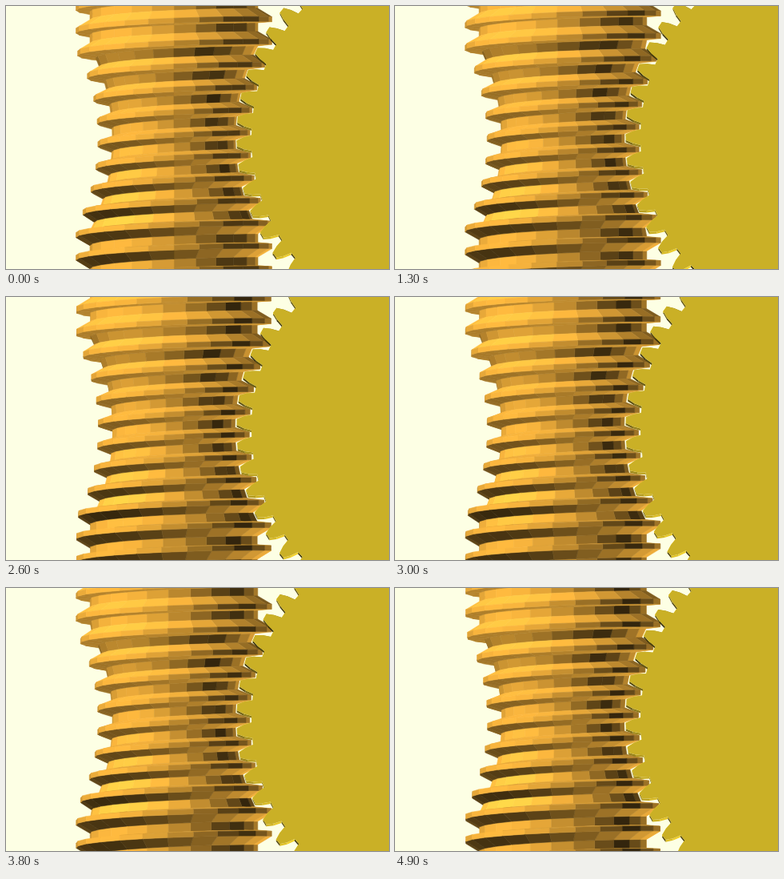
Animation of 479x329 px, one loop 5 s. Source, as an HTML page with a canvas:

```html
<!DOCTYPE html>
<html lang="en">
<head>
<meta charset="utf-8">
<title>Worm gear</title>
<style>
html, body { margin: 0; width: 479px; height: 329px; overflow: hidden; background: #fdffe4; }
canvas { display: block; }
</style>
</head>
<body>
<canvas id="stage" width="479" height="329"></canvas>
<script>
const ctx = document.getElementById('stage').getContext('2d');
const LOOP = 5000, STEP = 100, RAD = Math.PI / 180;
const AXIS = 210, MID = 165.7;            // worm axis x, throat y
const LEAD = 28.4, FACET = 15;            // thread pitch in px, facet in degrees
const GEAR_X = 541, TEETH = 53, REACH = GEAR_X - AXIS;
const TILT = 0.045;                       // the view comes slightly from below
const HALF = 28;                          // half the gear's thickness
const WORM = [252, 183, 62], GEAR = [249, 215, 44];

// Two opposite lights: top-left front and bottom-right back.
function shade(base, [x, y, z]) {
  const lit = 0.2 + Math.abs(z - x - y) / Math.sqrt(3) / Math.hypot(x, y, z);
  return `rgb(${base.map(c => Math.min(255, Math.round(c * lit)))})`;
}

function polygon(points, color, line) {
  ctx.beginPath();
  for (const [x, y, z] of points) ctx.lineTo(x, y - z * TILT);
  ctx.closePath();
  ctx.fillStyle = color;
  ctx.fill();
  if (line) {
    ctx.strokeStyle = color;
    ctx.lineWidth = line;
    ctx.stroke();
  }
}

// Hourglass radius at height y, limited by a cylinder.
const waist = (y, arc, limit) =>
  Math.min(limit, REACH - Math.sqrt(Math.max(0, arc * arc - y * y)));

// Thread section as [radius, y]: upper base, tip edges, lower base.
function section(y) {
  const r = waist(y, 236, 122.5);
  const foot = y + 8 * y / Math.hypot(REACH - r, y);
  const base = v => [waist(v, 254, 105), v];
  return [base(foot - 9), [r, y - 3], [r, y + 3], base(foot + 9)];
}

function column(j, turn) {
  const a = (j * FACET - 360 * turn) * RAD, points = [];
  for (let n = -8; n <= 9; n++) {
    for (const [r, y] of section(LEAD * (n - j * FACET / 360)))
      points.push([AXIS + r * Math.sin(a), MID + y, r * Math.cos(a)]);
  }
  return points;
}

function normal(a, b, c, d) {
  const p = c.map((v, i) => v - a[i]), q = d.map((v, i) => v - b[i]);
  return [p[1] * q[2] - p[2] * q[1], p[2] * q[0] - p[0] * q[2], p[0] * q[1] - p[1] * q[0]];
}

const towardsEye = ([, y, z]) => z + y * TILT;

function drawWorm(turn) {
  const faces = [], first = Math.floor((360 * turn - 120) / FACET);
  let left = column(first, turn);
  for (let j = first + 1; j < first + 18; j++) {
    const right = column(j, turn);
    for (let k = 1; k < left.length; k++) {
      const quad = [left[k - 1], right[k - 1], right[k], left[k]];
      const n = normal(...quad);
      if (towardsEye(n) > 0)
        faces.push({ quad, n, near: quad.reduce((sum, p) => sum + towardsEye(p), 0) });
    }
    left = right;
  }
  faces.sort((f, g) => f.near - g.near);
  for (const f of faces) polygon(f.quad, shade(WORM, f.n), 0.6);
}

function drawGear(turn) {
  const rim = [], pitch = 360 / TEETH;
  const tooth = [[234, -2.4], [244, -1.75], [252.5, -0.84], [252.5, 0.84], [244, 1.75], [234, 2.4]];
  for (let k = -10; k <= 10; k++) {
    for (const [r, off] of tooth) {
      const a = (pitch * (k - 0.25 + turn) + off) * RAD;
      rim.push([GEAR_X - r * Math.cos(a), MID - r * Math.sin(a), HALF]);
    }
  }
  const back = ([x, y]) => [x, y, -HALF];
  for (let i = 1; i < rim.length; i++) {
    const p = rim[i - 1], q = rim[i];
    polygon([p, q, back(q), back(p)], shade(GEAR, [q[1] - p[1], p[0] - q[0], 0]));
  }
  polygon([...rim, [700, -80, HALF], [700, 420, HALF]], '#cab026');
}

function draw(now) {
  const turn = Math.floor(now % LOOP / STEP) * STEP / LOOP;
  ctx.fillStyle = '#fdffe4';
  ctx.fillRect(0, 0, 479, 329);
  drawWorm(turn);
  drawGear(turn);
}

const start = performance.now();
function tick() {
  draw(performance.now() - start);
  requestAnimationFrame(tick);
}
tick();
</script>
</body>
</html>
```
